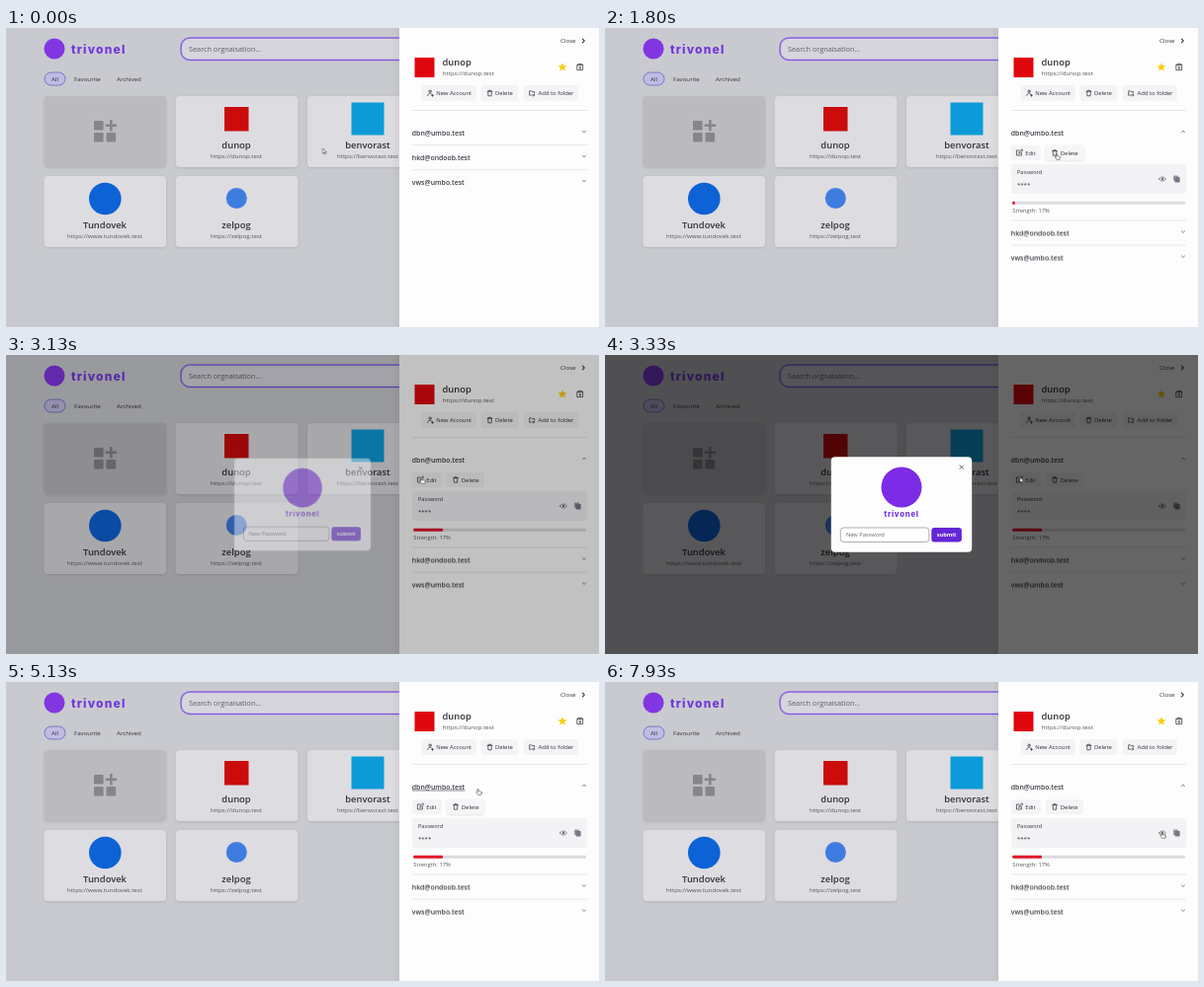
Recreate the animation shown at these times as an HTML page. Size 600 by 303 pixels, loop 8 s.

```html
<!DOCTYPE html>
<html lang="en">
<head>
<meta charset="utf-8">
<title>Password manager</title>
<style>
html, body { margin: 0; width: 100%; height: 100%; overflow: hidden; background: #c9cacf; }
svg { display: block; width: 100vw; height: 100vh; }
text { font-family: "Open Sans", "Noto Sans", sans-serif; font-size: 6.15px; fill: #33333a; }
.brand { font: 800 12px Inter, sans-serif; letter-spacing: 1.2px; fill: #7136dc; }
.brand.small { font-size: 7.8px; letter-spacing: .7px; }
.name { font-size: 9.4px; font-weight: 600; }
.url { fill: #55555c; }
.mid { text-anchor: middle; }
.mail { font-size: 6.9px; font-weight: 600; fill: #3c3c45; }
.btn text { font-size: 5.9px; font-weight: 500; }
.btn rect { fill: #f4f4f6; }
.icon { fill: none; stroke: #36363d; stroke-width: .75; stroke-linecap: round; stroke-linejoin: round; }
.rule { stroke: #e2e2e6; stroke-width: .8; }
.chev { fill: none; stroke: #55555f; stroke-width: .75; }

.anim { animation: 8s linear infinite; }
#rows { animation-name: rows; }
#panel { animation-name: panel; }
#flip { animation-name: flip; transform-origin: 585px 105px; }
#fill { animation-name: fill; transform-origin: 412.3px 177px; }
#hover { animation-name: hover; }
#underline { animation-name: underline; animation-timing-function: step-end; }
#dim { animation-name: dim; }
#modal { animation-name: modal; transform-origin: 300px 151.5px; }
#cursor { animation-name: cursor; }
#arrow { animation-name: arrow; animation-timing-function: step-end; }
#hand { animation-name: hand; animation-timing-function: step-end; }

@keyframes rows {
  0%, 18.5% { transform: translateY(0); animation-timing-function: ease; }
  21.3%, 100% { transform: translateY(76.5px); }
}
@keyframes panel { 0%, 18.5% { opacity: 0; } 21.3%, 100% { opacity: 1; } }
@keyframes flip {
  0%, 18.5% { transform: rotate(0); }
  21.3%, 100% { transform: rotate(-180deg); }
}
@keyframes fill {
  0%, 21.8% { transform: scaleX(0); animation-timing-function: ease; }
  29.5%, 100% { transform: scaleX(1); }
}
@keyframes hover {
  0%, 21% { opacity: 0; } 22.3%, 29% { opacity: 1; }
  30.5%, 57.5% { opacity: 0; } 59%, 64.2% { opacity: 1; }
  65.6%, 100% { opacity: 0; }
}
@keyframes underline {
  0% { opacity: 0; } 13% { opacity: 1; } 20.5% { opacity: 0; }
  63% { opacity: 1; } 67% { opacity: 0; } 100% { opacity: 0; }
}
@keyframes dim {
  0%, 38.25% { opacity: 0; } 39.125% { opacity: .235; }
  40.75%, 49.375% { opacity: .6; } 50% { opacity: .49; }
  51.375%, 100% { opacity: 0; }
}
@keyframes modal {
  0%, 38.25% { opacity: 0; transform: scale(.95); }
  39.125% { opacity: .45; transform: scale(.968); }
  40.75%, 49.375% { opacity: 1; transform: scale(1); }
  50% { opacity: .64; transform: scale(.985); }
  51.375%, 100% { opacity: 0; transform: scale(.95); }
}
@keyframes cursor {
  0%, 2% { transform: translate(320.5px, 122px); animation-timing-function: ease-in-out; }
  13% { transform: translate(446px, 107px); }
  19% { transform: translate(452px, 107px); animation-timing-function: ease-in-out; }
  22.5%, 27% { transform: translate(457px, 127px); animation-timing-function: ease-in-out; }
  35%, 41% { transform: translate(420.5px, 124px); animation-timing-function: ease-in-out; }
  47.5%, 51% { transform: translate(385.5px, 119px); animation-timing-function: ease-in-out; }
  58.5% { transform: translate(465px, 124px); }
  64.125%, 66% { transform: translate(477.5px, 108px); animation-timing-function: ease-in-out; }
  75%, 78.5% { transform: translate(499px, 149px); animation-timing-function: ease-in-out; }
  92%, 100% { transform: translate(563.5px, 152px); }
}
@keyframes arrow {
  0% { opacity: 1; } 11% { opacity: 0; } 40% { opacity: 1; }
  56% { opacity: 0; } 67% { opacity: 1; } 91% { opacity: 0; } 100% { opacity: 0; }
}
@keyframes hand {
  0% { opacity: 0; } 11% { opacity: 1; } 40% { opacity: 0; }
  56% { opacity: 1; } 67% { opacity: 0; } 91% { opacity: 1; } 100% { opacity: 1; }
}
</style>
</head>
<body>
<svg viewBox="0 0 600 303" preserveAspectRatio="none">
  <defs>
    <filter id="soft" x="-20%" y="-30%" width="140%" height="170%">
      <feDropShadow dx="0" dy=".7" stdDeviation="1" flood-opacity=".13"/>
    </filter>
    <linearGradient id="edge">
      <stop offset="0" stop-color="#000" stop-opacity="0"/>
      <stop offset="1" stop-color="#000" stop-opacity=".04"/>
    </linearGradient>
    <rect id="card" width="123.5" height="72" rx="4"/>
    <path id="down" class="chev" d="M-1.8-.9 0 .9 1.8-.9"/>
    <g id="bin" class="icon">
      <path d="M-2.4-1.8H2.4M-.9-1.8V-2.8H.9V-1.8M-1.8-1.8-1.6 2.8H1.6L1.8-1.8"/>
    </g>
  </defs>

  <!-- Page behind the drawer -->
  <rect width="600" height="303" fill="#c9cacf"/>
  <circle cx="49" cy="21" r="10.5" fill="#8236e2"/>
  <text class="brand" x="66" y="26">trivonel</text>
  <rect x="177" y="10" width="260" height="22.5" rx="9" fill="#d6d5dc" stroke="#b7a5e6" stroke-width="2.2"/>
  <rect x="177" y="10" width="260" height="22.5" rx="9" fill="none" stroke="#7c52d8"/>
  <text x="185" y="24.2" style="font-size:7.3px;fill:#5c5c66">Search orgnaisation...</text>

  <rect x="39" y="45" width="21" height="13" rx="6.5" fill="#c0bce3" stroke="#6c62c4" stroke-width=".8"/>
  <text class="mid" x="49.5" y="53.7">All</text>
  <text x="69" y="53.7">Favourite</text>
  <text x="112" y="53.7">Archived</text>

  <g fill="#dddce1" filter="url(#soft)">
    <use href="#card" x="38.5" y="69" fill="#bbbabf"/>
    <use href="#card" x="171.8" y="69"/>
    <use href="#card" x="305" y="69"/>
    <use href="#card" x="38.5" y="150"/>
    <use href="#card" x="171.8" y="150"/>
  </g>
  <g fill="#85858b">
    <rect x="89" y="94" width="9.6" height="9.6" rx="1"/>
    <rect x="89" y="106" width="9.6" height="9.6" rx="1"/>
    <rect x="101.5" y="106" width="9.6" height="9.6" rx="1"/>
    <path d="M105 93h2.6v4.4h4.4v2.6h-4.4v4.4H105V100h-4.4v-2.6h4.4z"/>
  </g>

  <rect x="221" y="80" width="24.5" height="24.5" fill="#cb0b0c"/>
  <text class="name mid" x="233" y="122">dunop</text>
  <text class="url mid" x="233" y="131.5">https://dunop.test</text>
  <rect x="349.5" y="75.5" width="33" height="33" fill="#0c9bd8"/>
  <text class="name mid" x="366" y="122">benvorast</text>
  <text class="url mid" x="366" y="131.5">https://benvorast.test</text>
  <circle cx="100.3" cy="173" r="16.3" fill="#0d62d6"/>
  <text class="name mid" x="100" y="203">Tundovek</text>
  <text class="url mid" x="100" y="213">https://www.tundovek.test</text>
  <circle cx="233.3" cy="172.5" r="10.5" fill="#3f7cdf"/>
  <text class="name mid" x="233" y="203">zelpog</text>
  <text class="url mid" x="233" y="213">https://zelpog.test</text>

  <!-- Drawer -->
  <rect x="390" width="8" height="303" fill="url(#edge)"/>
  <rect x="398" width="202" height="303" fill="#fdfdfe"/>
  <text x="561" y="15.3">Close</text>
  <path class="icon" d="M583.4 11.2 585.2 13 583.4 14.8" style="stroke-width:1.1"/>
  <rect x="413.5" y="30" width="20" height="20" fill="#df070d"/>
  <text class="name" x="441.5" y="37.8">dunop</text>
  <text class="url" x="441.8" y="47.7">https://dunop.test</text>
  <path fill="#f7cf16" d="M563 35.2l1.3 2.8 3.1.4-2.3 2.1.6 3.1-2.7-1.5-2.7 1.5.6-3.1-2.3-2.1 3.1-.4z"/>
  <path class="icon" d="M578.2 37.6h5.4v5h-5.4zM578.2 37.6l.7-1.2h4l.7 1.2M580.9 38.8v2.3M579.9 40.2l1 1 1-1"/>

  <g class="btn">
    <rect x="420.3" y="58" width="55.5" height="16" rx="3"/>
    <g class="icon">
      <circle cx="429" cy="64.2" r="1.2"/>
      <path d="M426.7 68.5c0-2.7 3.6-2.7 4.1-1.5M430.5 68.3h2M431.5 67.3v2"/>
    </g>
    <text x="435.2" y="68.2">New Account</text>
    <rect x="480.5" y="58" width="37.8" height="16" rx="3"/>
    <use href="#bin" x="489.5" y="66"/>
    <text x="495" y="68.2">Delete</text>
    <rect x="523.3" y="58" width="55.5" height="16" rx="3"/>
    <path class="icon" d="M531 68.2h-1.3v-4.4h1.8l.8.8h2.4v1.5M532 68h2.8M533.8 67l1 1-1 1"/>
    <text x="538.5" y="68.2">Add to folder</text>
  </g>
  <path class="rule" d="M411 83.5H588"/>

  <text class="mail" x="410.8" y="108.6">dbn@umbo.test</text>
  <path id="underline" class="anim" d="M411 110H464.5" stroke="#3c3c45" stroke-width=".6"/>
  <g id="flip" class="anim"><use href="#down" x="585" y="105"/></g>

  <g id="panel" class="anim">
    <g class="btn">
      <rect x="411" y="119" width="30" height="15" rx="3"/>
      <path class="icon" d="M419 124h-2.6v5h5V126.6M418.8 126.9l.3-1.4 2.8-2.7 1 1-2.8 2.7z"/>
      <text x="425.2" y="128.6">Edit</text>
      <rect x="446" y="119" width="38" height="15" rx="3"/>
      <rect id="hover" class="anim" x="446" y="119" width="38" height="15" rx="3" style="fill:#f6f6f8" filter="url(#soft)"/>
      <use href="#bin" x="455" y="126.4"/>
      <text x="460.8" y="128.6">Delete</text>
    </g>
    <rect x="411" y="138" width="177" height="30" rx="3" fill="#f3f3f5"/>
    <text x="417" y="148" style="font-size:5.6px">Password</text>
    <text x="417" y="161" style="font-size:6px">****</text>
    <path class="icon" style="stroke:#6a6a74" d="M560.5 153q3.5-4.4 7 0-3.5 4.4-7 0z"/>
    <circle cx="564" cy="153" r="1.2" fill="#6a6a74"/>
    <rect x="575" y="149.5" width="5" height="5.4" rx=".6" fill="#9a9aa6"/>
    <rect x="576.6" y="151" width="5" height="5.4" rx=".6" fill="#767684"/>
    <rect x="412.3" y="175.8" width="174.7" height="3" rx="1" fill="#dcdce0"/>
    <rect id="fill" class="anim" x="412.3" y="175.8" width="29.7" height="3" rx=".8" fill="#e3182b"/>
    <text x="412.3" y="187.2" style="font-size:5.8px;fill:#5a5a62">Strength: 17%</text>
  </g>

  <!-- Lower rows slide down and uncover the panel -->
  <g id="rows" class="anim">
    <rect x="398" y="117" width="202" height="190" fill="#fdfdfe"/>
    <path class="rule" d="M411 118.5H588M411 143.7H588"/>
    <text class="mail" x="410.8" y="133.7">hkd@ondoob.test</text>
    <use href="#down" x="585" y="130"/>
    <text class="mail" x="410.8" y="158.5">vws@umbo.test</text>
    <use href="#down" x="585" y="155"/>
  </g>

  <!-- Dialog -->
  <rect id="dim" class="anim" width="600" height="303"/>
  <g id="modal" class="anim">
    <rect x="228.8" y="103.3" width="142.4" height="96.4" rx="4" fill="#fdfdfe"/>
    <path class="icon" d="M359 112l3.4 3.4M362.4 112l-3.4 3.4"/>
    <circle cx="300" cy="134" r="20.5" fill="#7c2be6"/>
    <text class="brand small mid" x="300" y="164">trivonel</text>
    <rect x="238.3" y="175" width="89.5" height="14.5" rx="3" fill="#fff" stroke="#9a9aa2" stroke-width=".8"/>
    <text x="244" y="184.4" style="font-size:5.7px;fill:#66666e">New Password</text>
    <rect x="330.3" y="175" width="30.6" height="14.5" rx="3" fill="#6426d6"/>
    <text class="mid" x="345.6" y="184.3" style="font-weight:700;font-size:5.6px;fill:#fff">submit</text>
  </g>

  <g id="cursor" class="anim" fill="#fff" stroke="#222" stroke-width=".5" stroke-linejoin="round">
    <path id="arrow" class="anim" d="M0 0V5.2L1.3 4.1 2.1 6 3 5.6 2.2 3.8H3.8z"/>
    <path id="hand" class="anim" d="M-.6.6Q0-.5.6.6V2.6L3 3.1Q3.6 3.3 3.5 4L3 6.4H.2L-1.8 3.9Q-1.6 3-.6 3.8z"/>
  </g>
</svg>
</body>
</html>
```
